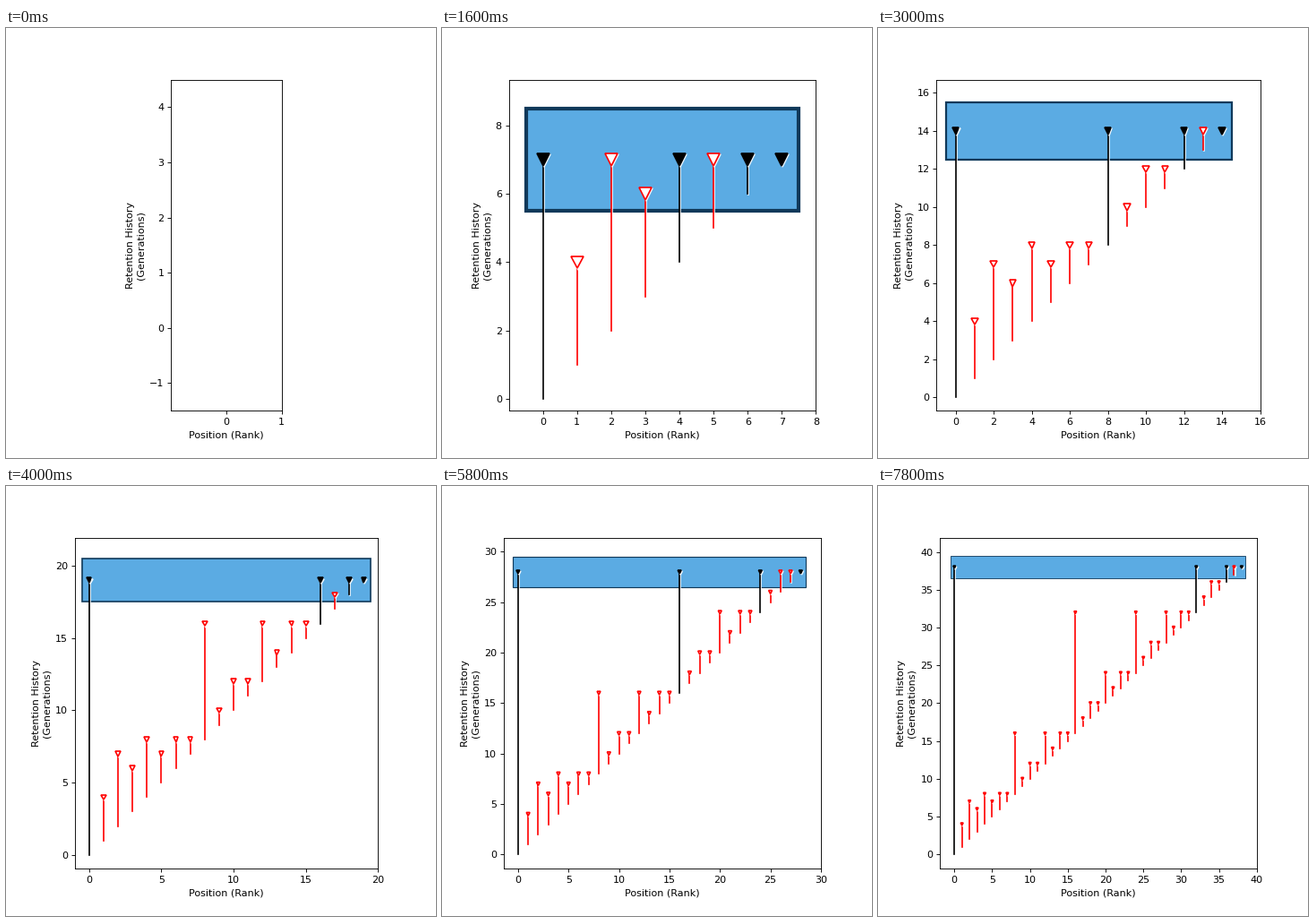
These frames come from a looping animation (480 px wide and 480 px high, 8000 ms). A matplotlib script:

```python
import matplotlib.pyplot as plt
from matplotlib import patheffects as pe
from matplotlib.animation import FuncAnimation
from matplotlib.patches import Rectangle
from matplotlib.ticker import MaxNLocator

FRAMES, INTERVAL = 40, 200
EARLY_DROPS = {1: 4, 2: 7, 3: 6, 5: 7}

fig, ax = plt.subplots(figsize=(6, 6), dpi=80)
shadow = [
    pe.SimpleLineShadow(offset=(1, -1), shadow_color="white", alpha=0.9),
    pe.Normal(),
]


def drop_gen(rank):
    """Generation at which a rank is discarded (rank 0 never is)."""
    if rank == 0:
        return float("inf")
    return EARLY_DROPS.get(rank, rank + (rank & -rank))


def set_limits(gen):
    if gen < 0:
        ax.set_xlim(-1, 1)
        ax.set_ylim(-1.5, 4.5)
        ax.set_xticks([0, 1])
        return
    pad = 0.05 * gen
    locator = MaxNLocator(nbins=9, steps=[1, 2, 2.5, 5, 10])
    values = locator.tick_values(-pad, max(gen + pad, 0.1))
    ticks = [round(v) for v in values if v > -0.01 and abs(v - round(v)) < 1e-6]
    ax.set_xticks(ticks)
    ax.set_xlim(min(-1, -pad), max(gen + pad, ticks[-1]))
    ax.set_ylim(-pad, gen + pad + 2)


def draw_drip(rank, gen):
    drop = drop_gen(rank)
    kept = drop > gen
    color = "black" if kept else "red"
    ax.plot(
        [rank, rank], [rank, min(drop, gen)],
        color=color, lw=1.5, marker="v", markevery=[1],
        ms=100 / (gen + 1), mew=1.5, mec=color,
        mfc="black" if kept else "white",
        path_effects=shadow,
    )


def draw(frame):
    gen = frame - 1
    ax.clear()
    ax.set_aspect("equal", adjustable="box")
    if gen >= 0:
        ax.add_patch(Rectangle(
            (-0.5, gen - 1.5), gen + 1, 3,
            fc="#5babe3", ec="#10395a", lw=30 / (gen + 1), zorder=0.5,
        ))
    for rank in range(gen + 1):
        draw_drip(rank, gen)
    set_limits(gen)
    ax.yaxis.set_major_locator(
        MaxNLocator(nbins=9, steps=[1, 2, 2.5, 5, 10], integer=True))
    ax.set_xlabel("Position (Rank)")
    ax.set_ylabel("Retention History\n(Generations)")
    return []


anim = FuncAnimation(
    fig, draw, frames=FRAMES, init_func=lambda: draw(0),
    interval=INTERVAL, repeat=True, repeat_delay=0,
)
plt.show()
```
